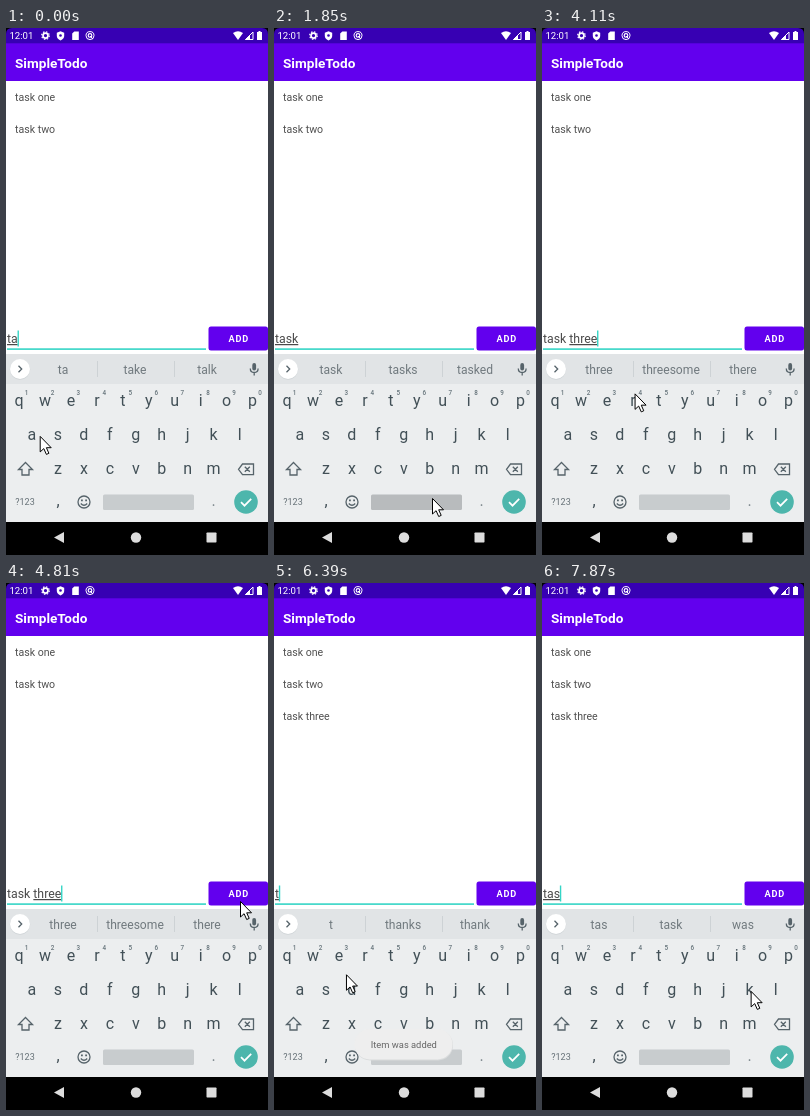
An HTML page that plays this animation: 262 by 527 pixels, repeating every 8000 ms.

```html
<!DOCTYPE html>
<html lang="en">
<head>
<meta charset="utf-8">
<title>Todo list</title>
<style>
html, body { margin: 0; width: 100%; height: 100%; overflow: hidden; background: #fff; }
svg { display: block; width: 100vw; height: 100vh; font-family: Roboto, sans-serif; }
text { white-space: pre; }
.mid { text-anchor: middle; }
.key { font-size: 16px; fill: #425057; }
.hint { font-size: 6.3px; font-weight: 500; fill: #65737a; }
.word { font-size: 12.1px; fill: #70797e; }
.item { font-size: 10.6px; fill: #505050; }
.line { fill: none; stroke: #56636a; stroke-width: 1.3; }
.ring { fill: none; stroke: #fff; }
</style>
</head>
<body>
<svg viewBox="0 0 262 527" preserveAspectRatio="none">
  <rect width="262" height="527" fill="#fff"/>
  <rect width="262" height="53" fill="#6200ee"/>
  <rect width="262" height="15.3" fill="#3700b3"/>
  <path d="M0 0h6q-6 0-6 6zM262 0h-6q6 0 6 6z"/>

  <!-- status bar -->
  <g fill="#fff">
    <text x="3.4" y="11.3" font-size="9.6">12:01</text>
    <circle class="ring" cx="39.5" cy="7.6" r="2.5" stroke-width="1.7"/>
    <circle class="ring" cx="39.5" cy="7.6" r="3.8" stroke-width="1.2" stroke-dasharray="1.5 1.48"/>
    <path d="M54.5 3.3l3.7 1.5v3q0 3-3.7 4.6q-3.7-1.6-3.7-4.6v-3z"/>
    <circle cx="54.5" cy="7.5" r="1.3" fill="#3700b3"/>
    <path d="M68.3 3.5h4.5v8.500h-6.600v-6.400z"/>
    <circle class="ring" cx="84" cy="7.6" r="4"/>
    <circle class="ring" cx="84" cy="7.4" r="1.8" stroke-width="1.2"/>
    <path d="M84 8l3 3" stroke="#fff"/>
    <path d="M227 5q5-3.500 10 0l-5 7z"/>
    <path class="ring" d="M247 4v7.500h-7.500z"/>
    <path d="M244 7v5h-5z"/>
    <path d="M251 4h1.500v-1h2v1h1.500v8h-5z"/>
    <text x="9" y="39.8" font-size="13.6" font-weight="700">SimpleTodo</text>
  </g>

  <text class="item" x="9" y="73.2">task one</text>
  <text class="item" x="9" y="105.2">task two</text>
  <text class="item" x="9" y="137.2" id="newItem">task three</text>

  <!-- entry row -->
  <text x="1" y="315" font-size="12.3" fill="#4a4a4a" id="entry"><tspan id="done"></tspan><tspan id="composing" text-decoration="underline"></tspan></text>
  <rect id="caret" y="302.5" width="1.4" height="16" fill="#35d5c6"/>
  <rect x="1" y="320.3" width="199" height="1.6" fill="#35d5c6"/>
  <rect id="add" x="202.5" y="298.5" width="59.5" height="24" rx="2.5"/>
  <text class="mid" x="232.8" y="314.2" font-size="9.2" font-weight="700" letter-spacing=".9" fill="#fff">ADD</text>

  <!-- keyboard -->
  <rect y="326" width="262" height="168" fill="#eceeef"/>
  <rect y="326" width="262" height="30" fill="#e1e4e6"/>
  <path d="M91.5 333v16M168.5 333v16" stroke="#cdd2d5"/>
  <circle cx="14" cy="341.6" r="10.2" fill="#cfd4d7"/>
  <circle cx="14" cy="341" r="10" fill="#fff"/>
  <path class="line" d="M12.5 337.8l3.2 3.2-3.2 3.2"/>
  <rect x="246.3" y="335" width="3.8" height="7.5" rx="1.9" fill="#56636a"/>
  <path class="line" d="M244.3 340.5q0 4 3.9 4t3.9-4M248.2 344.5v3"/>
  <g id="words"></g>
  <g id="keys"></g>
  <path class="line" d="M19.5 434.5l7 7h-3.5v5.5h-7v-5.500h-3.500z"/>
  <path class="line" d="M232.5 441.3l4-5.300h11v10.600h-11zM238.800 438.800l5 5M243.800 438.800l-5 5"/>
  <text class="mid" x="19" y="477.3" font-size="9" fill="#667177">?123</text>
  <text class="mid key" x="52" y="478">,</text>
  <circle class="line" cx="78" cy="474" r="6"/>
  <path class="line" d="M74.8 475.5q3.2 3.5 6.4 0"/>
  <path d="M75 471.5h1.800v1.800h-1.800zM79.200 471.500h1.800v1.800h-1.800z" fill="#56636a"/>
  <rect id="space" x="97" y="466.5" width="91" height="15.5" rx="1.5"/>
  <text class="mid key" x="207.5" y="478" style="fill:#7b868b">.</text>
  <circle cx="240" cy="474" r="11.8" fill="#4db6ac"/>
  <path class="ring" d="M235 474.2l3.5 3.5 6.7-6.9" stroke-width="1.7"/>

  <!-- navigation bar -->
  <rect y="494" width="262" height="33"/>
  <g fill="#ddd">
    <path d="M48 509.5l10-5.5v11z"/>
    <circle cx="130" cy="509.5" r="5.2"/>
    <rect x="200.5" y="504.5" width="10" height="10" rx=".7"/>
  </g>

  <g id="toast">
    <rect x="81" y="447" width="98" height="30.5" rx="15" fill="#d9dbdc"/>
    <rect x="80.5" y="446" width="98" height="30.5" rx="15" fill="#eee"/>
    <text class="mid" x="129.8" y="464.8" font-size="9.35" fill="#666">Item was added</text>
  </g>
  <path id="pointer" d="M.5 .5v15.500l3.600-3.300 2.600 5.800 2.500-1.100-2.500-5.600h4.800z" fill="#fff" stroke="#000" stroke-linejoin="round"/>
</svg>
<script>
const LOOP = 8000, TICK = 130, DWELL = 60, PRESS = 170;
const $ = id => document.getElementById(id);
const clamp = v => Math.max(0, Math.min(1, v));
const smooth = v => v * v * (3 - 2 * v);

// Every tap drives the pointer, the entry text and the suggestions.
const taps = [
  [-150, 'a'], [400, 's'], [1140, 'k'], [1950, ' '],
  [2450, 't'], [2770, 'h'], [3460, 'r'], [3610, 'e'], [3790, 'e'], [5080, 'add'],
  [6150, 't'], [6780, 'a'], [7400, 's'], [8050, 'k']
];
const addedAt = taps.find(tap => tap[1] === 'add')[0];

const suggestions = {
  '': 'I the you',
  t: 't thanks thank',
  ta: 'ta take talk',
  tas: 'tas task was',
  task: 'task tasks tasked',
  th: 'th that the',
  thr: 'thr three through',
  thre: 'thre three there',
  three: 'three threesome there'
};

function addText(parent, cls, x, y, value = '') {
  const node = document.createElementNS('http://www.w3.org/2000/svg', 'text');
  node.setAttribute('class', cls);
  node.setAttribute('x', x);
  node.setAttribute('y', y);
  node.textContent = value;
  return parent.appendChild(node);
}

const spots = { ' ': [158, 470], add: [234, 318] };
['qwertyuiop', 'asdfghjkl', 'zxcvbnm'].forEach((letters, row) =>
  [...letters].forEach((letter, i) => {
    const x = 13 + (i + row * (row + 1) / 4) * 25.95;
    const y = 378.3 + row * 33.6;
    spots[letter] = [x + 1, y - 4];
    addText($('keys'), 'mid key', x, y, letter);
    if (!row) addText($('keys'), 'mid hint', x + 7.5, y - 11, (i + 1) % 10);
  }));
const words = [0, 1, 2].map(i => addText($('words'), 'mid word', 57 + i * 72, 345.7));

// Leaves each key after a short dwell and reaches the next one early.
function pointerAt(t) {
  const i = taps.findIndex(tap => tap[0] > t);
  const [from, a] = taps[i - 1], [to, b] = taps[i];
  const k = smooth(clamp((t - from - DWELL) / ((to - from) * 0.6 - DWELL)));
  return spots[a].map((v, axis) => v + (spots[b][axis] - v) * k);
}

function entryAt(t) {
  return taps.filter(tap => tap[0] <= t)
    .reduce((text, [, key]) => key === 'add' ? '' : text + key, 't');
}

function isPressed(key, t) {
  return taps.some(([at, name]) => name === key && t < at && t >= at - PRESS);
}

function draw(time) {
  const t = Math.floor((time % LOOP) / TICK + 0.1) * TICK;
  const entry = entryAt(t);
  const cut = entry.lastIndexOf(' ') + 1;
  const word = entry.slice(cut);
  $('done').textContent = entry.slice(0, cut);
  $('composing').textContent = word;
  suggestions[word].split(' ').forEach((s, i) => { words[i].textContent = s; });

  const lastTap = taps.filter(tap => tap[0] <= t).pop()[0];
  const width = entry ? $('entry').getComputedTextLength() : 0;
  $('caret').setAttribute('x', 0.8 + width);
  $('caret').setAttribute('opacity', (t - lastTap) % 1000 < 500 ? 1 : 0);

  $('newItem').setAttribute('opacity', t >= addedAt ? 1 : 0);
  $('add').setAttribute('fill', isPressed('add', t) ? '#7c2df1' : '#6200ee');
  $('space').setAttribute('fill', isPressed(' ', t) ? '#b8bbbd' : '#c8ccce');
  $('toast').setAttribute('opacity', clamp((t - addedAt) / 200) * clamp((addedAt + 2150 - t) / 300));
  $('pointer').setAttribute('transform', `translate(${pointerAt(t)})`);
}

const start = performance.now();
function frame() {
  draw(performance.now() - start);
  requestAnimationFrame(frame);
}
frame();
</script>
</body>
</html>
```
